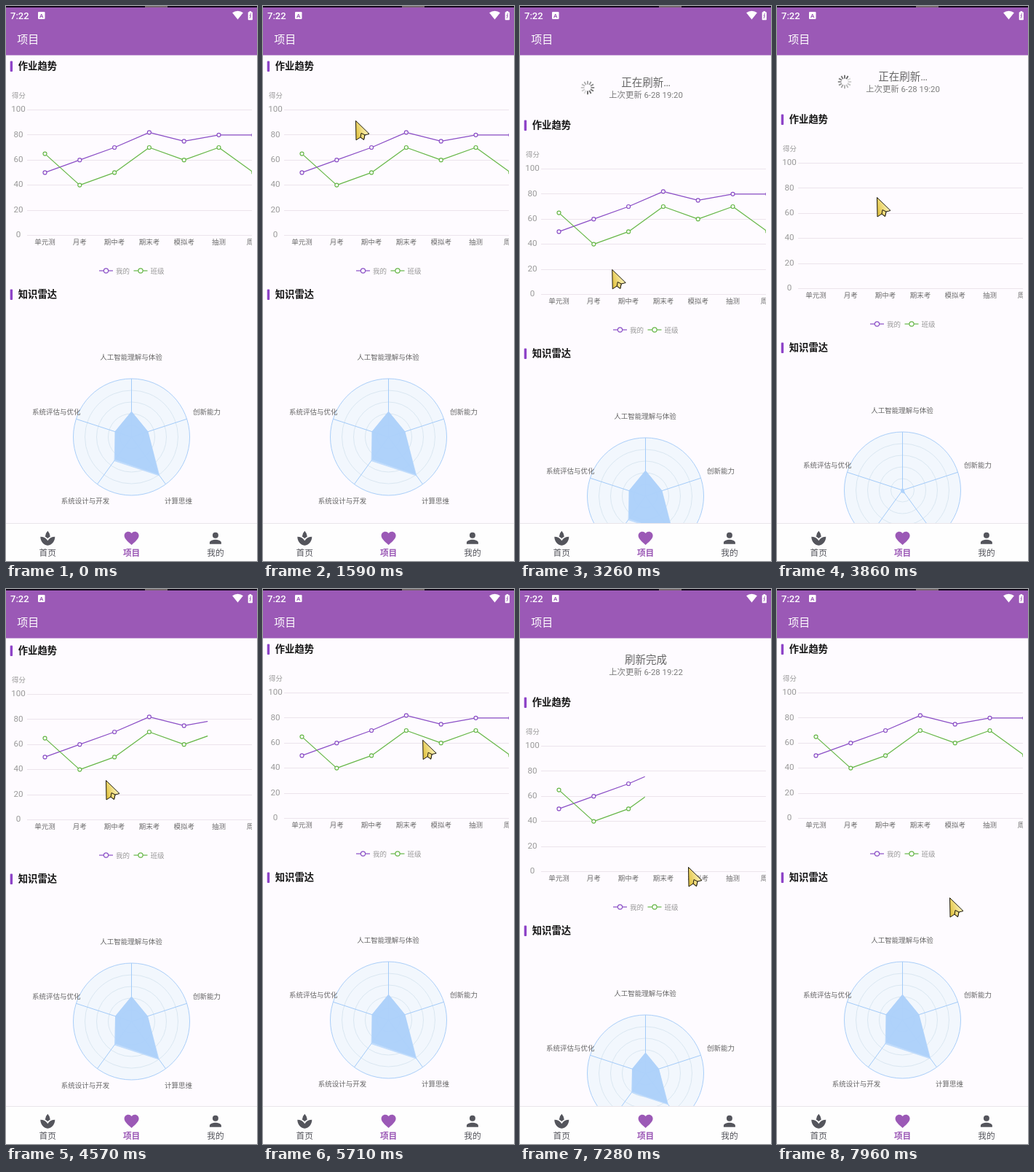
Write an HTML page with a canvas that moves like this. It is 345 px wide and 761 px high and loops after 8000 ms.

```html
<!DOCTYPE html>
<html lang="zh">
<head>
<meta charset="utf-8">
<style>
html, body { margin: 0; width: 100%; height: 100%; overflow: hidden; background: #fefbff; }
canvas { display: block; width: 345px; height: 761px; }
</style>
</head>
<body>
<canvas id="stage"></canvas>
<script>
const W = 345, H = 761, LOOP = 8000, TOP = 67.5, BOTTOM = 709;
const BG = '#fefbff', BRAND = '#9b59b6', PURPLE = '#8b4fc6', GREEN = '#67b748', GREY = '#54555c';
const FONT = 'Roboto, "Noto Sans CJK SC", "Noto Sans CJK", sans-serif';

const canvas = document.getElementById('stage');
const ctx = canvas.getContext('2d');
const dpr = window.devicePixelRatio || 1;
canvas.width = W * dpr;
canvas.height = H * dpr;

const clamp = p => Math.max(0, Math.min(1, p));
const smooth = p => p * p * (3 - 2 * p);
const range = n => [...Array(n).keys()];

// Timing of the two pull-to-refresh gestures
const pulls = [
  { drag: 2660, release: 3200, reload: 3830 },
  { drag: 5860, release: 6270, reload: 6855 }
];
const HEADER = 73, PEAK = 98, DRAG = 300, REBOUND = 300, HOLD = 580, GROW = 1000;

// Pointer moves: start, end, target x, target y
const moves = [
  [750, 1590, 127, 157],
  [1590, 1850, 128, 117],
  [2600, 2830, 126, 363],
  [3250, 3800, 137, 262],
  [5250, 5800, 235, 196],
  [5850, 6170, 231, 381],
  [7580, 7740, 237, 423]
];

function pointerAt(t) {
  return moves.reduce(([x, y], [from, to, tx, ty]) => {
    const p = clamp((t - from) / (to - from));
    return [x + (tx - x) * p, y + (ty - y) * p];
  }, [252, 685]);
}

function viscous(p) {
  const f = q => q < 1 ? q - 1 + Math.exp(-q) : 1 - (1 - Math.exp(-1)) * Math.exp(1 - q);
  return f(8 * clamp(p)) / f(8);
}

function refreshState(t) {
  const pull = t < 5250 ? pulls[0] : pulls[1];
  const done = t - pull.reload;
  let y = PEAK * smooth(clamp((t - pull.drag) / DRAG));
  y += (HEADER - PEAK) * viscous((t - pull.release) / REBOUND);
  y -= HEADER * viscous((done - HOLD) / REBOUND);
  const phase = done > 80 ? 'done' : t >= pull.release ? 'busy' : y > HEADER ? 'ready' : 'pull';
  return {
    y: Math.round(y),
    phase,
    grow: done < 0 ? 1 : clamp(done / GROW),
    stamp: t < pulls[0].reload + 80 ? '19:20' : '19:22'
  };
}

function text(s, x, y, size, color, align = 'left', weight = 400) {
  ctx.font = `${weight} ${size}px ${FONT}`;
  ctx.fillStyle = color;
  ctx.textAlign = align;
  ctx.fillText(s, x, y + size * 0.37);
}

function line(x1, y1, x2, y2, color, width = 1) {
  ctx.strokeStyle = color;
  ctx.lineWidth = width;
  ctx.beginPath();
  ctx.moveTo(x1, y1);
  ctx.lineTo(x2, y2);
  ctx.stroke();
}

function circle(x, y, r, stroke, fill, width = 1.2) {
  ctx.beginPath();
  ctx.arc(x, y, r, 0, 7);
  if (fill) { ctx.fillStyle = fill; ctx.fill(); }
  ctx.strokeStyle = stroke;
  ctx.lineWidth = width;
  ctx.stroke();
}

function polygon(points, fill) {
  ctx.beginPath();
  points.forEach(([x, y]) => ctx.lineTo(x, y));
  ctx.closePath();
  ctx.fillStyle = fill;
  ctx.fill();
}

function box(x, y, w, h, r, color) {
  ctx.fillStyle = color;
  ctx.beginPath();
  ctx.roundRect(x, y, w, h, r);
  ctx.fill();
}

// Symmetric icons are given by their left half
function mirrored(d) {
  const half = new Path2D(d), whole = new Path2D(half);
  whole.addPath(half, new DOMMatrix([-1, 0, 0, 1, 0, 0]));
  return whole;
}

const icons = {
  leaf: mirrored('M0-10Q-3.2-6.8-3.5-2.4Q-1.5-1.3 0 .3ZM0 3.4Q-3.5-2-10-2C-10 4-6 9.2 0 10Z'),
  heart: mirrored('M0 9.3C-7 3-10 0-10-3.5C-10-6.6-7.6-9-4.5-9Q-1.8-9 0-6.9Z'),
  person: mirrored('M0-8A4 4 0 0 0 0 0ZM0 2C-2.7 2-8 3.3-8 6V8H0Z')
};

function section(title, y) {
  box(5.7, y - 7, 3.4, 14.5, 1, '#8e44c8');
  text(title, 16.8, y, 13.3, '#151515', 'left', 700);
}

const chartX = i => 53.5 + 47.8 * i;
const chartY = v => 314.4 - 1.72 * v;

function series(values, color, edge) {
  ctx.save();
  ctx.beginPath();
  ctx.rect(29, 100, edge - 29, 230);
  ctx.clip();
  ctx.strokeStyle = color;
  ctx.lineWidth = 1.25;
  ctx.lineJoin = 'round';
  ctx.beginPath();
  values.forEach((v, i) => ctx.lineTo(chartX(i), chartY(v)));
  ctx.stroke();
  ctx.restore();
  values.forEach((v, i) => {
    if (chartX(i) < edge) circle(chartX(i), chartY(v), 2.5, color, '#fff');
  });
}

function legend(label, x, color) {
  line(x, 363, x + 19, 363, color, 1.2);
  circle(x + 9.5, 363, 3.1, color, '#fff');
  text(label, x + 23, 363, 9.5, '#999');
}

function trend(grow) {
  section('作业趋势', 82.5);
  text('得分', 8, 122.5, 9.4, '#999');
  ctx.save();
  ctx.beginPath();
  ctx.rect(0, 90, 338, 290);
  ctx.clip();
  for (let v = 0; v <= 100; v += 20) {
    const y = Math.floor(chartY(v)) + 0.5;
    line(29, y, 338, y, '#ece4ec');
    text(v, 17, chartY(v) - 1.5, 11.6, '#999', 'center');
  }
  ['单元测', '月考', '期中考', '期末考', '模拟考', '抽测', '周测'].forEach((s, i) =>
    text(s, chartX(i), 323.5, 9.5, '#6c6c6c', 'center'));
  const edge = 29 + 335 * grow;
  series([50, 60, 70, 82, 75, 80, 80], PURPLE, edge);
  series([65, 40, 50, 70, 60, 70, 50], GREEN, edge);
  ctx.restore();
  legend('我的', 128, PURPLE);
  legend('班级', 175.5, GREEN);
}

function radar(grow) {
  section('知识雷达', 395.5);
  const cx = 172.5, cy = 591, R = 80;
  const at = (i, r) => {
    const a = (i * 0.4 - 0.5) * Math.PI;
    return [cx + r * Math.cos(a), cy + r * Math.sin(a)];
  };
  circle(cx, cy, R, '#a9cef9', '#f2f7fd', 1);
  for (let r = 16; r < R; r += 16) circle(cx, cy, r, '#d3e2ee', null, 0.8);
  range(5).forEach(i => line(cx, cy, ...at(i, R), '#a3cbf9'));
  const scale = R * (1 - (1 - grow) ** 3);
  const area = (low, fill) =>
    polygon([0.44, 0.3, low + 0.32, low, 0.3].map((v, i) => at(i, v * scale)), fill);
  area(0.51, 'rgba(184,216,252,.85)');
  area(0.48, 'rgba(172,209,251,.85)');
  const label = (s, x, y, align) => text(s, x, y, 9.5, '#666', align);
  label('人工智能理解与体验', 172, 481.5, 'center');
  label('创新能力', 257, 556.5);
  label('计算思维', 218, 678.5);
  label('系统设计与开发', 142.3, 678.5, 'right');
  label('系统评估与优化', 102.5, 556.5, 'right');
}

function spinner(x, y, t) {
  const step = Math.floor(t / 83);
  range(12).forEach(i => {
    const a = i * Math.PI / 6, c = Math.cos(a), s = Math.sin(a);
    const g = 95 + ((step - i) % 12 + 12) % 12 * 11;
    line(x + c * 4.5, y + s * 4.5, x + c * 9.2, y + s * 9.2, `rgb(${g},${g},${g})`, 1.8);
  });
}

function arrow(x, y, up) {
  ctx.save();
  ctx.translate(x, y);
  if (up) ctx.scale(1, -1);
  line(0, -9, 0, 8, '#666', 2.4);
  ctx.beginPath();
  ctx.moveTo(-8.5, 0);
  ctx.lineTo(0, 8.5);
  ctx.lineTo(8.5, 0);
  ctx.stroke();
  ctx.restore();
}

const messages = { pull: '下拉可以刷新', ready: '释放立即刷新', busy: '正在刷新…', done: '刷新完成' };

function refreshHeader({ phase, stamp }, t) {
  if (phase === 'busy') spinner(93, 31, t);
  else if (phase !== 'done') arrow(93, 31, phase === 'ready');
  text(messages[phase], 173, 24, 14.5, '#666', 'center');
  text('上次更新 6-28 ' + stamp, 173, 41.2, 11.35, '#7c7c7c', 'center');
}

function statusIcons() {
  box(44, 8, 9.5, 10, 1.2, '#fff');
  text('A', 48.75, 13, 8, BRAND, 'center', 700);
  ctx.fillStyle = '#fff';
  ctx.beginPath();
  ctx.moveTo(318.5, 18.5);
  ctx.arc(318.5, 18.5, 11.8, -2.25, -0.89);
  ctx.fill();
  box(332.7, 8.2, 6.2, 11, 0.8, '#fff');
  box(334.5, 7, 2.6, 2, 0, '#fff');
  line(336.6, 10.2, 335, 14, BRAND);
  line(336.6, 13.2, 335, 17, BRAND);
}

function appBar() {
  box(0, 0, W, TOP, 0, BRAND);
  box(0, 0, W, 2, 0, '#14081c');
  box(191, 0, 31, 2, 0, '#77676f');
  text('7:22', 6, 13.3, 13, '#fff', 'left', 500);
  statusIcons();
  text('项目', 15.3, 45.8, 15, '#fff');
}

function navBar() {
  box(0, BOTTOM, W, H - BOTTOM, 0, '#fefefe');
  line(0, BOTTOM + 0.5, W, BOTTOM + 0.5, '#e9e5ea');
  [['leaf', '首页'], ['heart', '项目'], ['person', '我的']].forEach(([name, label], i) => {
    const on = i === 1, x = 57.3 + 115.3 * i;
    text(label, x, 749.6, 11.7, on ? BRAND : GREY, 'center', on ? 700 : 400);
    ctx.save();
    ctx.translate(x, 729.8);
    ctx.fill(icons[name]);
    ctx.restore();
  });
}

function cursor(t) {
  if (t < moves[0][0]) return;
  const [x, y] = pointerAt(t);
  ctx.save();
  ctx.translate(x + 0.5, y + 0.5);
  const gold = ctx.createLinearGradient(0, 14, 14, 10);
  gold.addColorStop(0, '#e2c548');
  gold.addColorStop(1, '#fbf0b0');
  ctx.lineJoin = 'round';
  ctx.lineWidth = 1;
  ctx.strokeStyle = '#1c180c';
  const tail = [[12.5, 19.5], [11, 26], [6.5, 22.5]];
  polygon([[0, 0], [18.5, 18], ...tail, [0.5, 26.5]], gold);
  ctx.stroke();
  polygon([[7.5, 17], ...tail], gold);
  ctx.stroke();
  ctx.restore();
}

function draw(t) {
  const state = refreshState(t);
  ctx.setTransform(dpr, 0, 0, dpr, 0, 0);
  box(0, 0, W, H, 0, BG);
  ctx.save();
  ctx.translate(0, state.y);
  if (state.y > 0) refreshHeader(state, t);
  trend(state.grow);
  radar(state.grow);
  ctx.restore();
  appBar();
  navBar();
  cursor(t);
}

const start = performance.now();
function frame() {
  draw((performance.now() - start) % LOOP);
  requestAnimationFrame(frame);
}
frame();
</script>
</body>
</html>
```
